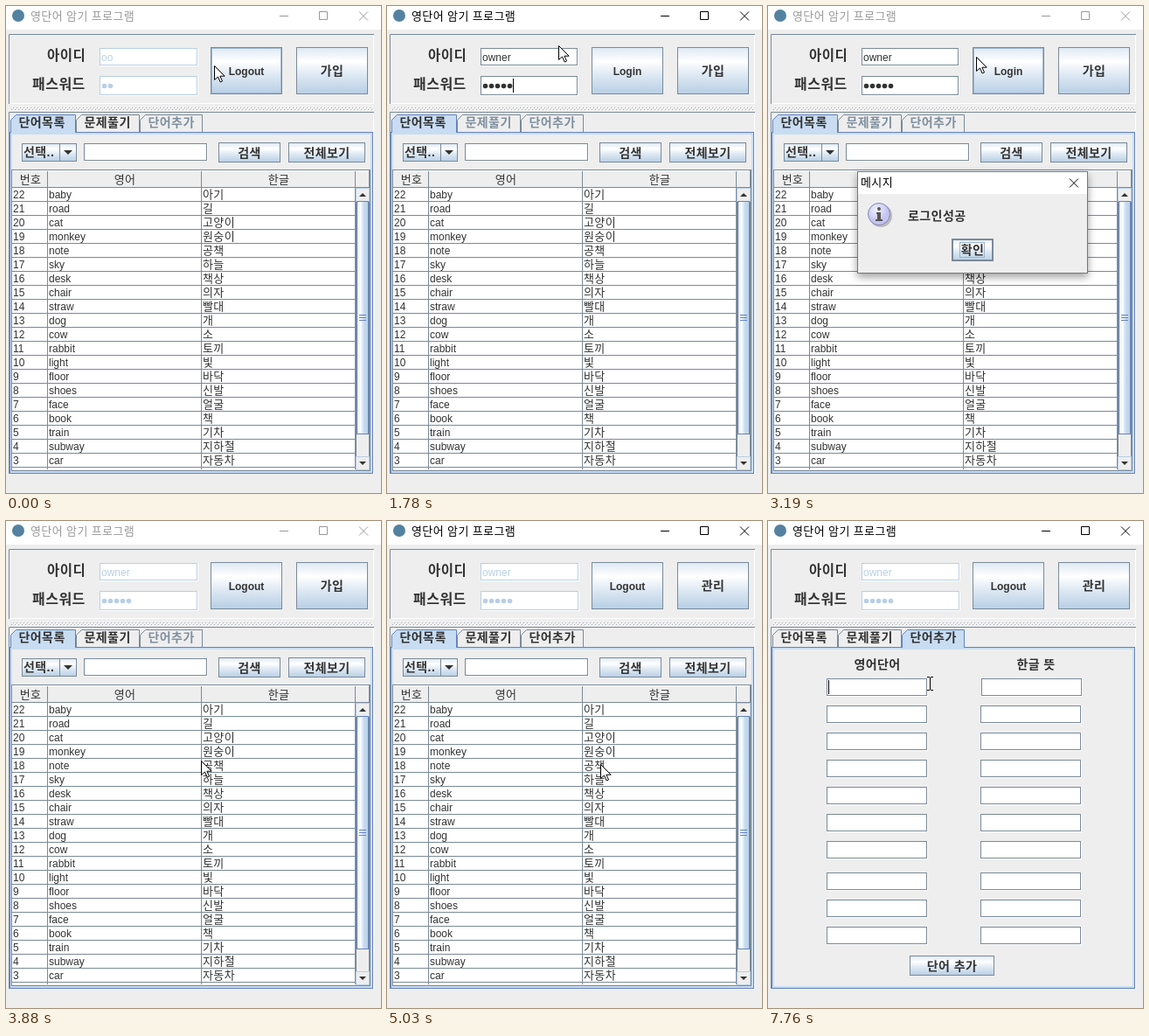
Animation, 429 px wide and 557 px high, one loop 7990 ms. Source, as an HTML page:

```html
<!DOCTYPE html>
<html lang="ko">
<head>
<meta charset="utf-8">
<title>영단어 암기 프로그램</title>
<style>
html, body { margin: 0; width: 100%; height: 100%; overflow: hidden; background: #eee; }
svg { display: block; font-family: 'Liberation Sans', 'Noto Sans CJK KR', 'Noto Sans CJK JP', sans-serif; }
text { white-space: pre; }
.ko { letter-spacing: .03em; }
</style>
</head>
<body>
<svg id="stage" width="429" height="557" viewBox="0 0 429 557">
  <defs>
    <linearGradient id="ocean" x2="0" y2="1">
      <stop offset="0" stop-color="#dde8f3"/><stop offset=".3" stop-color="#fff"/>
      <stop offset=".6" stop-color="#dde8f3"/><stop offset="1" stop-color="#b8cfe5"/>
    </linearGradient>
    <linearGradient id="thumb">
      <stop offset="0" stop-color="#dde8f3"/><stop offset=".3" stop-color="#fff"/>
      <stop offset=".6" stop-color="#c8ddf2"/><stop offset="1" stop-color="#b8cfe5"/>
    </linearGradient>
    <radialGradient id="info" cx=".4" cy=".3">
      <stop offset="0" stop-color="#f2f2ff"/><stop offset="1" stop-color="#c4c4f2"/>
    </radialGradient>
    <pattern id="bumps" width="4" height="4" patternUnits="userSpaceOnUse">
      <path d="M0 0h1v1h-1zM2 2h1v1h-1z" fill="#a0a8b0"/>
      <path d="M1 1h1v1h-1zM3 3h1v1h-1z" fill="#fff"/>
    </pattern>
    <filter id="shadow" x="-20%" y="-20%" width="140%" height="150%">
      <feDropShadow dx="0" dy="4" stdDeviation="5" flood-opacity=".38"/>
    </filter>
  </defs>
  <g id="scene"></g>
</svg>
<script>
const LOOP = 7990;
const INK = '#333', EDGE = '#7a8a99', PALE = '#b8cfe5', BLUE = '#6382bf', SELECTED = '#c8ddf2', PANEL = '#eee';
const USER = 'owner';
const WORDS = [['baby', '아기'], ['road', '길'], ['cat', '고양이'], ['monkey', '원숭이'], ['note', '공책'],
  ['sky', '하늘'], ['desk', '책상'], ['chair', '의자'], ['straw', '빨대'], ['dog', '개'], ['cow', '소'],
  ['rabbit', '토끼'], ['light', '빛'], ['floor', '바닥'], ['shoes', '신발'], ['face', '얼굴'],
  ['book', '책'], ['train', '기차'], ['subway', '지하철'], ['car', '자동차']];

// [start, end, steps, x, y]: the pointer hops to (x, y) in equal steps
const MOVES = [[470, 770, 5, 213, 64], [920, 920, 1, 205, 58], [1150, 1150, 1, 196, 45],
  [2550, 2630, 2, 208, 42], [2710, 2790, 2, 238, 58], [3340, 3650, 5, 223, 274],
  [4490, 4570, 2, 244, 278], [5260, 5650, 6, 185, 138], [6280, 6740, 7, 165, 189], [7140, 7210, 2, 185, 186]];

const within = (t, from, to) => t >= from && t < to;

// Latest value of a list of [time, value] steps
const held = (t, steps) => steps.reduce((value, [time, next]) => t >= time ? next : value, steps[0][1]);

function pointerAt(t) {
  let x = 238, y = 68;
  for (const [start, end, steps, toX, toY] of MOVES) {
    if (t < start) break;
    const gap = (end - start) / (steps - 1) || 1;
    const p = Math.min(1, (Math.floor((t - start) / gap + 1e-6) + 1) / steps);
    x += (toX - x) * p;
    y += (toY - y) * p;
  }
  return [Math.round(x), Math.round(y)];
}

const box = (x, y, w, h, fill, stroke = 'none', extra = '') =>
  `<rect x="${x}" y="${y}" width="${w}" height="${h}" fill="${fill}" stroke="${stroke}" ${extra}/>`;
const frame = (x, y, w, h, fill, stroke, extra) => box(x + .5, y + .5, w - 1, h - 1, fill, stroke, extra);
const path = (d, stroke, fill = 'none', extra = '') => `<path d="${d}" stroke="${stroke}" fill="${fill}" ${extra}/>`;

function label(x, y, string, { size, bold, fill = INK, anchor = 'start' } = {}) {
  const korean = /[가-힣]/.test(string);
  size ??= korean ? (bold ? 14 : 13) : 12;
  return `<text x="${x}" y="${y}" font-size="${size}" fill="${fill}" text-anchor="${anchor}"` +
    `${bold ? ' font-weight="700"' : ''}${korean ? ' class="ko"' : ''}>${string}</text>`;
}
const centred = (x, y, string, options) => label(x, y, string, { anchor: 'middle', ...options });

function button(x, y, w, h, string, { hover, pressed } = {}) {
  return frame(x, y, w, h, pressed ? PALE : 'url(#ocean)', EDGE) +
    (hover ? frame(x + 1, y + 1, w - 2, h - 2, 'none', '#9fb8d2') : '') +
    centred(x + w / 2, y + h / 2 + 5, string, { bold: true });
}

function field(x, y, w, h = 20, enabled = true) {
  return box(x, y, w + 1, h + 1, '#fff') + frame(x, y, w, h, '#fff', enabled ? EDGE : PALE);
}

const caret = (x, y) => box(Math.round(x), y, 1, 16, '#000');

function titleBar(active) {
  const ink = active ? '#000' : '#999';
  return box(0, 0, 429, 27, '#fff') + '<circle cx="14" cy="11" r="7" fill="#5382a1"/>' +
    label(28, 16, '영단어 암기 프로그램', { fill: ink }) +
    path('M313 11.5h10M358.5 6.5h9v9h-9zM404 6.5l10 10M414 6.5l-10 10', ink);
}

function loginPanel(t) {
  const enabled = within(t, 390, 3880);
  const ink = enabled ? INK : PALE;
  const [id, idWidth] = held(t, [[0, ['oo', 13]], [390, ['', 0]], [1150, [USER.slice(0, 1), 7]],
    [1230, [USER.slice(0, 3), 22]], [1310, [USER, 33]]]);
  const dots = held(t, [[0, 2], [390, 0], [1780, 5]]);
  const action = enabled ? 'Login' : 'Logout';
  const hover = t < 540 || within(t, 2790, 3880);
  const focused = within(t, 230, 920) || within(t, 5110, 6670);
  const half = enabled ? 16 : 20;
  const w = enabled ? 111 : 112;
  let out = path('M3.5 112V32.5H421', EDGE) + path('M4 111.5H420.5V33', '#fff') +
    label(47, 62, '아이디', { size: 15.5, bold: true }) + label(30, 95, '패스워드', { size: 16, bold: true }) +
    field(107, 48, w, 20, enabled) + field(107, 80, w, 22, enabled) + label(109, 63, id, { fill: ink });
  for (let i = 0; i < dots; i++) out += `<circle cx="${112.5 + 7 * i}" cy="91.5" r="2.8" fill="${ink}"/>`;
  if (within(t, 920, 1460)) out += caret(109 + idWidth, 50);
  if (within(t, 1460, 2240) || within(t, 2710, 2950)) out += caret(109 + 7 * dots, 83);
  out += button(234, 47, 82, 54, action, { hover }) + button(332, 47, 82, 54, t < 5030 ? '가입' : '관리');
  if (focused) out += frame(275 - half, 65, half * 2 + 1, 18, 'none', '#9fb4ca');
  return out + box(6, 115, 414, 5, 'url(#bumps)') + path('M3.5 535V121.5H421', EDGE) + path('M420.5 122V535', '#fff');
}

function tabs(t) {
  const selected = t < 5970 ? 0 : 2;
  const loggedIn = !within(t, 390, 3880);
  const list = [['단어목록', 5, 80, true], ['문제풀기', 80, 153, loggedIn], ['단어추가', 153, 225, t >= 5030]];
  const head = list.map(([name, from, to, enabled], i) => {
    const on = i === selected;
    return path(`M${from + .5} 144V130.5L${from + 6.5} 124.5H${to - .5}V144`, on ? BLUE : EDGE, on ? SELECTED : PANEL) +
      label(from + 9.5, 138, name, { bold: true, fill: enabled ? INK : '#8090a0' });
  }).join('');
  const [, from, to] = list[selected];
  return frame(4, 144, 416, 391, PANEL, BLUE) +
    box(6, 146, 412, 387, 'none', SELECTED, 'stroke-width="2"') + head +
    box(from + 1, 143, to - from - 2, 3, SELECTED);
}

function wordList() {
  let out = frame(18, 157, 63, 21, 'url(#ocean)', EDGE) + path('M61.5 157v21', EDGE) +
    path('M66 165h10l-5 5z', 'none', INK) + label(20, 172, '선택..', { bold: true }) +
    field(89, 157, 141) + button(243, 156, 71, 23, '검색') + button(323, 156, 88, 23, '전체보기') +
    box(6, 187, 411, 344, PANEL) + box(7, 208, 393, 322, '#fff') +
    centred(28, 203, '번호') + centred(136, 203, '영어') + centred(312, 203, '한글');
  WORDS.forEach(([english, korean], i) => {
    const y = 220 + 16 * i;
    out += label(8, y, String(22 - i)) + label(49, y, english) + label(225, y, korean) +
      path(`M7 ${y + 3.5}H400`, EDGE);
  });
  out += path('M7 207.5H416M47.5 188V530M223.5 188V530M399.5 188V530M415.5 188V208', EDGE) +
    path('M7 188.5H415', '#fff') +
    frame(400, 208, 16, 323, PANEL, EDGE) + frame(400, 208, 16, 16, PANEL, PALE) + frame(400, 515, 16, 16, PANEL, PALE) +
    path('M404 218h8l-4-4zM404 521h8l-4 4z', 'none', INK) +
    frame(401, 223, 14, 267, 'url(#thumb)', BLUE) +
    path('M404 353.5h8M404 356.5h8M404 359.5h8', BLUE) +
    frame(6, 187, 411, 345, 'none', EDGE);
  return out;
}

function wordForm(t) {
  let out = centred(125, 169, '영어단어', { bold: true }) + centred(306.5, 169, '한글 뜻', { bold: true });
  for (let i = 0; i < 10; i++) {
    const y = 180 + 31 * i + (i > 6 ? 5 : 0);
    out += field(67, y, 115) + field(i ? 243 : 244, y, 115);
  }
  if (within(t, 6670, 7140) || t >= 7760) out += caret(69, 182);
  return out + button(162, 497, 97, 23, '단어 추가');
}

function dialog(t) {
  const [opacity, scale] = held(t, [[0, [0, 1]], [2950, [.35, .94]], [3070, [.8, .98]], [3190, [1, 1]],
    [3880, [0, 1]], [3940, [.3, .93]], [4020, [.7, .97]], [4100, [.92, .99]], [4190, [1, 1]],
    [4950, [.45, .96]], [5030, [0, 1]]]);
  if (!opacity) return '';
  const pressed = within(t, 3800, 3880);
  return `<g opacity="${opacity}" transform="translate(234 248) scale(${scale}) translate(-234 -248)">` +
    frame(102, 189, 264, 117, PANEL, '#777', 'filter="url(#shadow)"') + box(103, 190, 262, 25, '#fff') +
    label(106, 206, '메시지', { fill: '#000' }) + path('M345 197.5l10 10M355 197.5l-10 10', '#000') +
    '<circle cx="129" cy="240" r="13" fill="#bbb"/><circle cx="127" cy="238" r="12.5" fill="url(#info)" stroke="#8686b4"/>' +
    path('M124 236h5v8h2v2h-8v-2h2v-6h-1z', 'none', '#555') + '<circle cx="127" cy="232" r="2" fill="#555"/>' +
    label(160, 245, t < 3900 ? '로그인성공' : '관리자 로그인', { bold: true }) +
    button(210, 266, 48, 26, '확인', { pressed }) +
    box(211, 267, 46, 24, 'none', EDGE, 'stroke-width="2"') +
    frame(219, 270, 29, 18, 'none', '#9fb4ca') + '</g>';
}

function pointer(t) {
  const [x, y] = pointerAt(t);
  if (within(t, 920, 1150) || t >= 6670)
    return path(`M${x - 3} ${y - 7.5}h3M${x + 1} ${y - 7.5}h3M${x + .5} ${y - 7}v14M${x - 3} ${y + 7.5}h3M${x + 1} ${y + 7.5}h3`, '#000');
  return path(`M${x + .5} ${y + .5}v16l4-3.5 2.7 6 2.3-1-2.6-5.8h5.3z`, '#000', '#fff');
}

function render(t) {
  const active = within(t, 150, 2950) || t >= 5030;
  return box(0, 0, 429, 557, PANEL) + titleBar(active) + loginPanel(t) + tabs(t) +
    (t < 5970 ? wordList() : wordForm(t)) + dialog(t) + pointer(t);
}

const scene = document.getElementById('scene');
const start = performance.now();
let shown = '';
function tick() {
  const next = render((performance.now() - start) % LOOP);
  if (next !== shown) scene.innerHTML = shown = next;
  requestAnimationFrame(tick);
}
tick();
</script>
</body>
</html>
```
